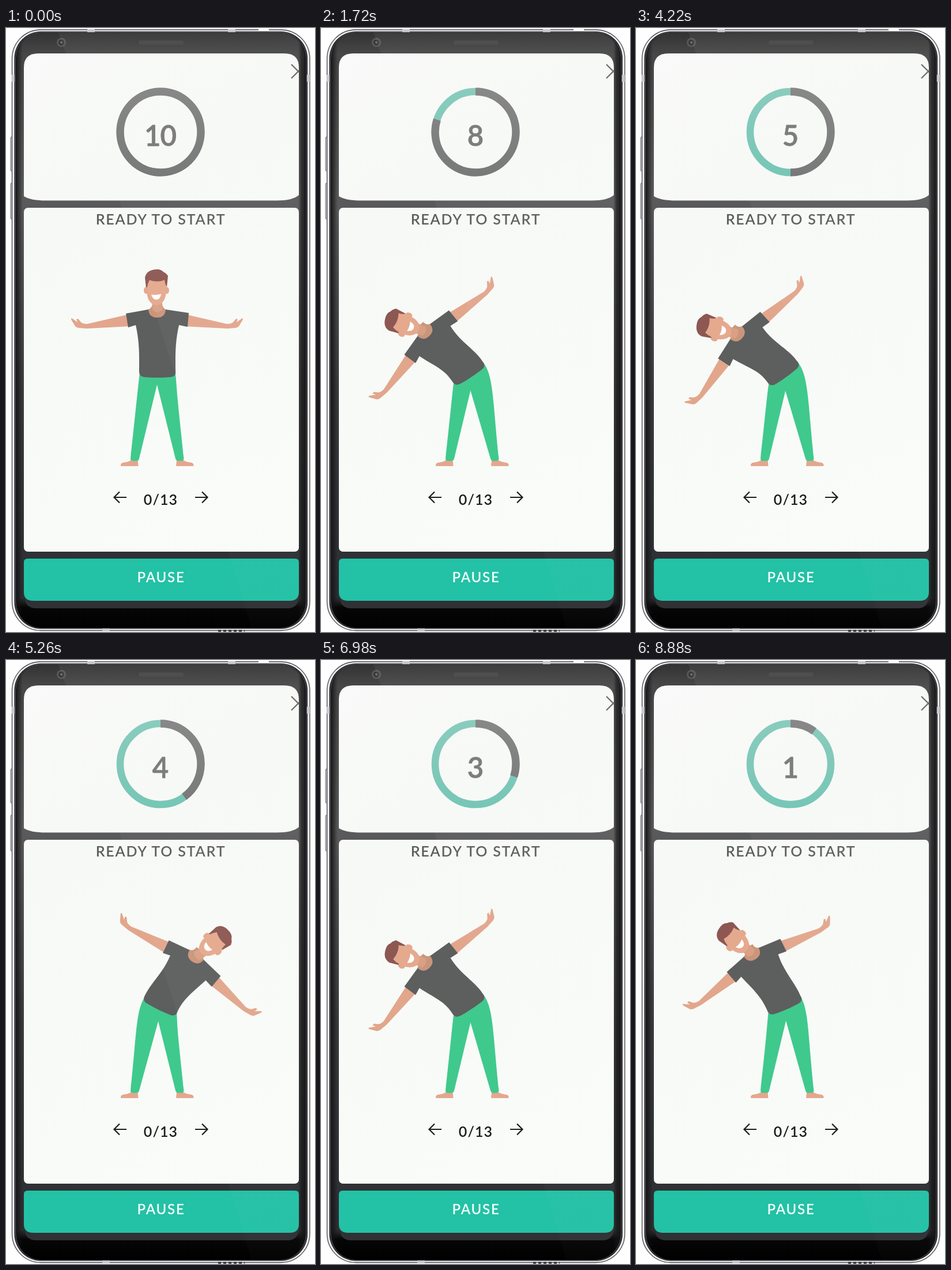
Animation of 536 by 1045 pixels, one loop 8.9 s. Source, as an HTML page:

```html
<!DOCTYPE html>
<html lang="en">
<head>
<meta charset="utf-8">
<title>Workout timer</title>
<style>
html, body { margin: 0; width: 100%; height: 100%; overflow: hidden; background: #fefefe; }
svg { display: block; width: 100vw; height: 100vh; }
text { font-family: Lato, "Open Sans", sans-serif; font-weight: 600; text-anchor: middle; }
</style>
</head>
<body>
<svg viewBox="0 0 536 1045">
  <defs>
    <linearGradient id="glass" x2="0" y2="1">
      <stop offset="0" stop-color="#333334"/><stop offset=".035" stop-color="#474748"/>
      <stop offset=".28" stop-color="#5a5a5c"/><stop offset=".6" stop-color="#3b3b3e"/>
      <stop offset=".95" stop-color="#2c2e32"/><stop offset=".965" stop-color="#060606"/>
      <stop offset="1" stop-color="#000"/>
    </linearGradient>
    <linearGradient id="edges">
      <stop offset="0" stop-color="#111" stop-opacity=".75"/><stop offset=".02" stop-color="#111" stop-opacity="0"/>
      <stop offset=".978" stop-color="#111" stop-opacity="0"/><stop offset=".99" stop-color="#111" stop-opacity=".7"/>
      <stop offset="1" stop-color="#111" stop-opacity=".85"/>
    </linearGradient>
    <linearGradient id="paper" gradientUnits="userSpaceOnUse" x1="31" y1="43" x2="508" y2="906">
      <stop offset="0" stop-color="#f9faf9"/><stop offset=".3" stop-color="#f7f9f6"/>
      <stop offset="1" stop-color="#fafcf9"/>
    </linearGradient>
    <linearGradient id="ringGray" gradientUnits="userSpaceOnUse" x1="192" y1="180" x2="344" y2="180">
      <stop offset="0" stop-color="#737374"/><stop offset="1" stop-color="#828283"/>
    </linearGradient>
    <linearGradient id="ringTeal" gradientUnits="userSpaceOnUse" x1="192" y1="180" x2="344" y2="180">
      <stop offset="0" stop-color="#70c4b3"/><stop offset="1" stop-color="#84cabb"/>
    </linearGradient>
    <linearGradient id="sheen" x2="0" y2="1">
      <stop offset="0" stop-color="#fff" stop-opacity=".05"/><stop offset="1" stop-color="#fff" stop-opacity=".015"/>
    </linearGradient>
    <clipPath id="screen"><rect x="31" y="43" width="477.5" height="960"/></clipPath>
    <clipPath id="front"><rect x="19" y="8" width="499" height="1030" rx="42"/></clipPath>
    <path id="arm" fill="#e2a68c" d="M306 494L318 497L383 512Q391 512 394 509L399 503L402 504L400 509L410 502Q412 503 410 506L404 516Q401 519 396 519L384 520L308 516Z"/>
    <path id="foot" fill="#e4a78d" d="M296 747H307Q311 751 322 752Q327 754 325 758H295Z"/>
  </defs>

  <!-- phone -->
  <g fill="#d6d6db" stroke="#5d5d68">
    <rect x="8" y="188.500" width="4" height="59" rx="1.5"/>
    <rect x="8" y="268.500" width="4" height="62" rx="1.5"/>
  </g>
  <rect x="10.5" y="3" width="516.5" height="1039.5" rx="50" fill="#ececef" stroke="#46464c" stroke-width="1.3"/>
  <rect x="14.500" y="6" width="508.500" height="1033.500" rx="46.500" fill="#17171a"/>
  <rect x="16.500" y="7.500" width="504.500" height="1030.500" rx="45" fill="none" stroke="#77777c" stroke-width=".8"/>
  <rect x="19" y="8.500" width="499" height="1029.500" rx="42" fill="url(#glass)"/>
  <rect x="19" y="8.500" width="499" height="1029.500" rx="42" fill="url(#edges)"/>
  <g fill="#c9c9cd">
    <rect x="141" y="2" width="13" height="5"/><rect x="385" y="2" width="13" height="5"/>
    <rect x="167" y="1039" width="13" height="5"/>
    <rect x="10" y="81" width="5" height="12"/><rect x="522" y="81" width="5" height="12"/>
  </g>
  <path d="M368 1043H414" stroke="#29292c" stroke-width="3" stroke-dasharray="5 4"/>
  <path d="M438 3H456" stroke="#fafafa" stroke-width="3"/>
  <path d="M32 985Q34 1004 52 1004H490Q506 1003 508 985" fill="#2f3135"/>
  <circle cx="96" cy="25" r="8" fill="#58585a"/>
  <circle cx="96" cy="25" r="5" fill="#373739"/>
  <circle cx="96" cy="25" r="2" fill="#727276"/>
  <rect x="229" y="21" width="80" height="9" rx="4" fill="#454546" stroke="#3a3a3b"/>

  <!-- panels -->
  <path fill="url(#paper)" d="M31 68Q31 44 56 44H483Q508 44 508 68V289Q497 298.500 470 298.500H70Q42 298.500 31 291Z"/>
  <rect x="31" y="311" width="477" height="595" rx="7" fill="url(#paper)"/>
  <path fill="#23c1a5" d="M31 924Q31 918 38 918H501Q508 918 508 924V976Q508 991 492 991H47Q31 991 31 976Z"/>
  <path d="M495 63L507 75L495 87M519 63L507 75L519 87" fill="none" stroke="#69696a" stroke-width="2.4" clip-path="url(#screen)"/>

  <!-- countdown -->
  <g fill="none" transform="rotate(-90 268 180)">
    <circle cx="268" cy="180" r="70" stroke-width="12.6" stroke="url(#ringTeal)"/>
    <circle id="left" cx="268" cy="180" r="70" stroke-width="13.4" pathLength="10" stroke="url(#ringGray)"/>
  </g>
  <text id="count" x="267.5" y="204" font-size="49" letter-spacing="-1" fill="#777778" stroke="#777778" stroke-width=".8" stroke-linejoin="round"></text>
  <text x="268.5" y="340" font-size="25" letter-spacing="1.8" fill="#5b5b5c">READY TO START</text>

  <!-- figure -->
  <use href="#foot"/>
  <use href="#foot" transform="translate(524.5) scale(-1 1)"/>
  <path id="pants" fill="#40c98d"/>
  <g id="upper">
    <use href="#arm"/>
    <use href="#arm" transform="translate(524) scale(-1 1)"/>
    <path fill="#ca967b" d="M246 487Q254 485 254 476H271Q271 485 278 487L276 505H248Z"/>
  </g>
  <path id="shirt" fill="#5d5e5e"/>
  <g id="head">
    <path fill="#d9a086" d="M254 466H271V488Q262 495 254 488Z"/>
    <ellipse cx="243" cy="454" rx="4" ry="6" fill="#e4a78d"/>
    <ellipse cx="279" cy="454" rx="4" ry="6" fill="#e4a78d"/>
    <path fill="#e5a98e" d="M244 432H278L278 456Q277 471 269 477Q261 482 253 477Q245 471 244 456Z"/>
    <path fill="#8d5752" d="M243 449L241 432Q243 420 257 418Q268 416 273 422Q278 424 281 429L279 448Q276 444 275 436Q262 441 249 436Q246 441 245 448Z"/>
    <path fill="#fff" d="M252 461Q261 463 269 460Q268 470 260 470Q254 469 252 461Z"/>
  </g>

  <!-- pager and button -->
  <path d="M209 812H188M197 802.500L187.500 812L197 821.500M328 812H349M340 802.500L349.500 812L340 821.500" fill="none" stroke="#1d1d1d" stroke-width="2.2"/>
  <text x="268.500" y="825" font-size="25" letter-spacing="1.1" fill="#1b1b1c">0/13</text>
  <text x="269" y="959" font-size="24" letter-spacing="1.8" fill="#f5fffc">PAUSE</text>

  <path clip-path="url(#front)" fill="url(#sheen)" d="M88 0H536V1045H428L293 598L197 300Z"/>
</svg>
<script>
const LOOP = 8900, SWAY = 2440, START = 80, LEAN = 50;
const HIP = 262, WAIST = 602;
const $ = id => document.getElementById(id);
const set = (id, name, value) => $(id).setAttribute(name, value);

// Maps a point of the upright figure to one turned about the waist.
function turner(deg, shift, sink = 0) {
  const a = deg * Math.PI / 180, c = Math.cos(a), s = Math.sin(a);
  return (x, y) => {
    const dx = x - HIP, dy = y - WAIST;
    return (HIP + shift + dx * c - dy * s).toFixed(2) + " " + (WAIST + sink + dx * s + dy * c).toFixed(2);
  };
}

function drawFigure(angle) {
  const shift = angle * 0.08, sink = Math.abs(angle) * 0.07;
  const chest = turner(angle, shift, sink), hem = turner(angle * 0.75, shift);
  const turn = `translate(${shift} ${sink}) rotate(${angle} ${HIP} ${WAIST})`;
  set("upper", "transform", turn);
  set("head", "transform", `${turn} rotate(${angle * 0.55} ${HIP} 492)`);

  set("shirt", "d", `M${chest(247, 487)}L${chest(208, 494)}L${chest(212, 518)}L${chest(225, 514)}
    C${chest(232, 545)} ${hem(231, 568)} ${hem(231, 592)}
    Q${hem(230, 603)} ${hem(240, 604)}Q${hem(262, 606)} ${hem(285, 604)}
    Q${hem(296, 603)} ${hem(294, 592)}
    C${hem(294, 568)} ${chest(293, 545)} ${chest(300, 514)}
    L${chest(315, 517)}L${chest(317, 493)}L${chest(277, 487)}
    Q${chest(276, 501)} ${chest(262, 501)}Q${chest(248, 501)} ${chest(247, 487)}Z`);

  // The hip on the stretched side bulges; the other side stays straight.
  const rightHip = angle < 0 ? hem(296, 625) : "298 648";
  const leftHip = angle > 0 ? hem(229, 625) : "226 648";
  const crotch = `${HIP + angle * 0.06} ${617 + Math.abs(angle) * 0.23}`;
  set("pants", "d", `M${hem(232, 596)}L${hem(294, 596)}
    C${rightHip} 298 645 308.500 745Q308 749 304 749H299Q295 749 294 745
    L${crotch}L231 745Q230 749 226 749H220Q216 749 216 745
    C227 645 ${leftHip} ${hem(232, 596)}Z`);
}

function drawCount(t) {
  const n = 10 - Math.floor((t + 900) / 1000);
  $("count").textContent = n;
  set("left", "stroke-dasharray", `${n} 10`);
}

function frame() {
  const t = performance.now() % LOOP;
  drawCount(t);
  drawFigure(LEAN * Math.sin(2 * Math.PI * Math.max(0, t - START) / SWAY));
  requestAnimationFrame(frame);
}
frame();
</script>
</body>
</html>
```
